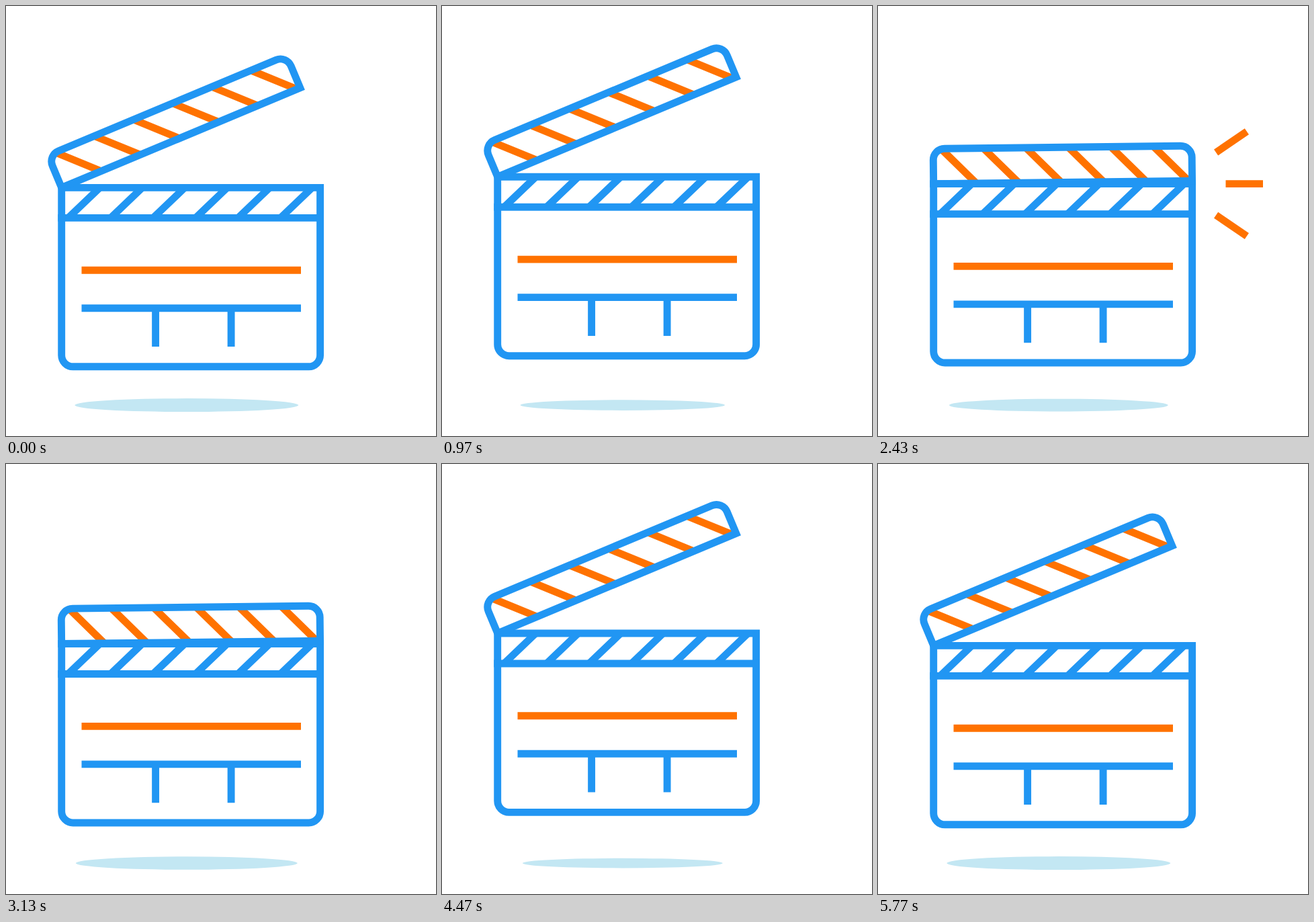
An HTML page that plays this animation: 640 by 640 pixels, repeating every 6010 ms.

```html
<!DOCTYPE html>
<html lang="en">
<head>
<meta charset="utf-8">
<title>Clapperboard</title>
<style>
  html, body { margin: 0; width: 100%; height: 100%; overflow: hidden; background: #fff; }
  svg { display: block; width: 100%; height: 100%; }
  .line { fill: none; stroke: #2196f3; stroke-width: 10.9; }
  .accent { fill: none; stroke: #ff7200; stroke-width: 10.9; }
</style>
</head>
<body>
<svg viewBox="0 0 640 640">
  <ellipse id="shadow" cx="268.8" cy="594.1" fill="#c3e7f3"/>
  <g id="board">
    <path id="lowStripes" class="line"/>
    <path class="line" d="M82.7 315.4V270.4H467.6V315.4"/>
    <path class="line" d="M77.3 315.4H473"/>
    <path class="line" d="M82.7 315.4V519.8a17 17 0 0 0 17 17H450.6a17 17 0 0 0 17-17V315.4"/>
    <path class="accent" d="M112.5 393.2H439"/>
    <path class="line" d="M112.5 449.7H439M222.6 449.7V507M335.1 449.7V507"/>
    <g id="arm">
      <path id="armStripes" class="accent"/>
      <path class="line" d="M0 0V-35.2a17 17 0 0 1 17-17H367.9a17 17 0 0 1 17 17V0Z"/>
    </g>
    <path id="sparks" class="accent"/>
  </g>
</svg>
<script>
const LOOP = 6010, HEIGHT = 18.5;
const $ = id => document.getElementById(id);
const set = (id, attrs) => {
  for (const name in attrs) $(id).setAttribute(name, attrs[name]);
};

// 0 to 1 between two times; push is the speed at the start, and the end is always soft
function ramp(t, from, to, push = 0) {
  const u = Math.min(1, Math.max(0, (t - from) / (to - from)));
  return u * u * (3 - 2 * u) + push * u * (1 - u) ** 2;
}

const rise = (t, from, to) => ramp(t, from, to, 1.2);
const fall = (t, from, to) => 1 - ramp(to + from - t, from, to, 0.4);

// Two hops per loop
const hop = t => HEIGHT * (rise(t, 0, 1360) - fall(t, 1540, 2870)
  + rise(t, 2984, 4184) - fall(t, 4440, 5770));

// Wind up, clap shut, swing open, settle
const tilt = t => 22.7 + 2 * ramp(t, 1500, 1800) - 24.06 * ramp(t, 1895, 2300)
  + 24.26 * ramp(t, 3200, 3710) - 2.2 * ramp(t, 3710, 3980);

function stripes(x, y, dx, dy) {
  let d = "";
  for (let i = 0; i < 6; i++) d += `M${x + i * 63.2} ${y}l${dx} ${dy}`;
  return d;
}

// Three rays fanning out from the clap
function rays(t) {
  const head = ramp(t, 2270, 2420), tail = ramp(t, 2380, 2540);
  if (head <= tail) return "";
  let d = "";
  for (let i = -1; i <= 1; i++) {
    const a = i * 0.6;
    const at = u => `${435 + (65 + 73 * u) * Math.cos(a)} ${270.4 + (65 + 73 * u) * Math.sin(a)}`;
    d += `M${at(tail)}L${at(head)}`;
  }
  return d;
}

function draw(t) {
  const h = hop(t), shrink = 0.45 * h + 0.027 * h * h;
  set("board", { transform: `translate(0 ${-h})` });
  set("arm", { transform: `translate(82.7 270.4) rotate(${-tilt(t)})` });
  set("shadow", { rx: 166.5 - shrink, ry: 10 - 0.155 * shrink });
  set("sparks", { d: rays(t) });
}

set("lowStripes", { d: stripes(138.6, 271.4, -45, 43) });
set("armStripes", { d: stripes(12.5, -51.2, 50.2, 50.2) });

const start = performance.now();
function tick() {
  draw((performance.now() - start) % LOOP);
  requestAnimationFrame(tick);
}
draw(0);
requestAnimationFrame(tick);
</script>
</body>
</html>
```
